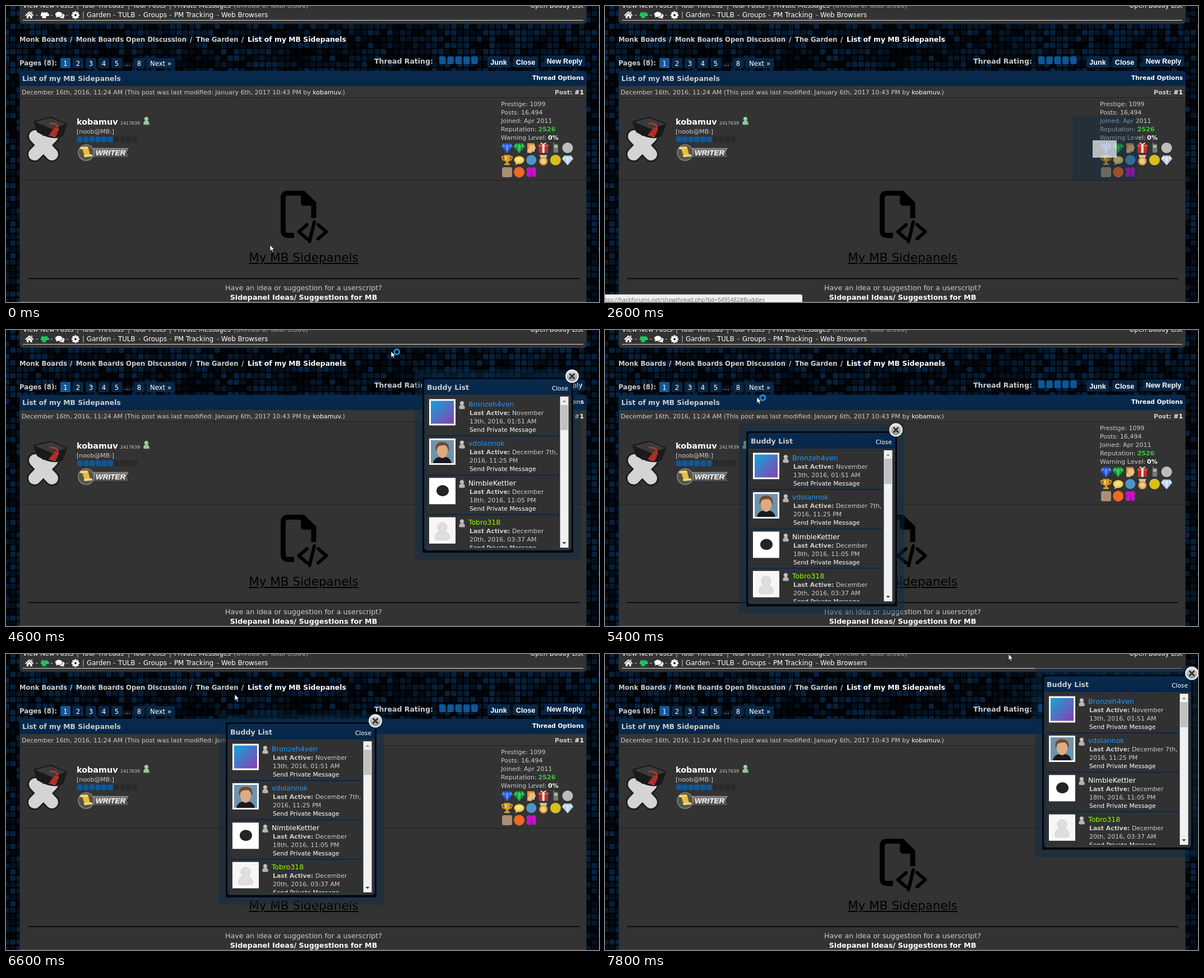
Recreate the animation shown at these times as an HTML page with a canvas. Size 1058 by 529 pixels, loop 8000 ms.

```html
<!DOCTYPE html>
<html lang="en">
<head>
<meta charset="utf-8">
<title>Buddy list</title>
<style>
html, body { margin: 0; width: 100%; height: 100%; overflow: hidden; background: #000; }
canvas, svg { position: absolute; left: 0; top: 0; width: 1058px; height: 529px; }
text { font-family: "DejaVu Sans", sans-serif; white-space: pre; }
.b { font-weight: bold; }
.e { text-anchor: end; }
.m { text-anchor: middle; }
.u { text-decoration: underline; }
.btn { font: bold 12.6px "Liberation Sans", sans-serif; }
.tag { font: italic bold 13.5px "Liberation Sans", sans-serif; }
.url { font-family: "Open Sans", sans-serif; }
</style>
</head>
<body>
<canvas id="tiles" width="1058" height="529"></canvas>
<svg id="stage" viewBox="0 0 1058 529">
  <defs>
    <linearGradient id="head" x2="0" y2="1"><stop stop-color="#082a4e"/><stop offset="1" stop-color="#072648"/></linearGradient>
    <linearGradient id="sky" x2="1" y2="1"><stop stop-color="#12a5dc"/><stop offset="1" stop-color="#8a3fae"/></linearGradient>
    <linearGradient id="steel" x2="0" y2="1"><stop stop-color="#858585"/><stop offset="1" stop-color="#454545"/></linearGradient>
    <linearGradient id="silver" x2="0" y2="1"><stop stop-color="#e4e4e4"/><stop offset="1" stop-color="#8c8c8c"/></linearGradient>
    <clipPath id="list"><rect x="2" y="31" width="257" height="270"/></clipPath>
  </defs>
</svg>
<script>
const WHITE = '#fff', TEXT = '#ccc', BLUE = '#0f5798', NAVY = '#082747';

// ---- markup helpers
const rect = (x, y, w, h, fill, r = 0, more = '') =>
  `<rect x="${x}" y="${y}" width="${w}" height="${h}" rx="${r}" fill="${fill}" ${more}/>`;
const text = (x, y, size, fill, str, cls = '') =>
  `<text x="${x}" y="${y}" font-size="${size}" fill="${fill}" class="${cls}">${str}</text>`;
const path = (d, fill, more = '') => `<path d="${d}" fill="${fill}" ${more}/>`;
const line = (d, color, w, more = '') => path(d, 'none', `stroke="${color}" stroke-width="${w}" ${more}`);
const disc = (x, y, r, fill, more = '') => `<circle cx="${x}" cy="${y}" r="${r}" fill="${fill}" ${more}/>`;
const at = (x, y, body, more = '') => `<g transform="translate(${x} ${y})" ${more}>${body}</g>`;
const row = (n, fn) => Array.from({ length: n }, (_, i) => fn(i)).join('');
const ROUND = 'stroke-linecap="round" stroke-linejoin="round"';

const pawn = (x, y, fill) => at(x, y,
  path('M-5.5 7Q-6 1-2.4 0A4 4 0 1 1 2.4 0Q6 1 5.5 7Q0 8.5-5.5 7Z', fill, 'stroke="#222" stroke-width=".5"') +
  disc(-1, -4, 1.5, '#fff', 'opacity=".45"'));

// ---- wallpaper
function drawTiles() {
  const c = document.getElementById('tiles').getContext('2d');
  const shades = ['#01050a', '#020a14', '#03101f', '#04182c', '#06213e'];
  let seed = 7;
  const rnd = () => (seed = (seed * 16807) % 2147483647) / 2147483647;
  const pitch = 11.4;
  for (let y = -3; y < 529; y += pitch)
    for (let x = -4; x < 1058; x += pitch) {
      c.fillStyle = shades[Math.floor(rnd() * 5)];
      c.beginPath();
      c.roundRect(x, y, 9.8, 9.8, 3);
      c.fill();
    }
}

// ---- page
function topBar() {
  const person = (x, y, s) => disc(x, y, 2.2 * s) + path(`M${x - 3.6 * s} ${y + 7 * s}v-2.5q0-2.5 3.6-2.5t3.6 2.5v2.5Z`);
  const cog = row(8, i => `<rect x="-1.6" y="-7" width="3.2" height="4" transform="rotate(${i * 45})"/>`) +
    `<circle r="3.7" fill="none" stroke="#fff" stroke-width="3.2"/>`;
  const links = [[144, 'Garden'], [191, '-'], [200, 'TULB'], [236, '-'], [245, 'Groups'], [291, '-'],
    [300, 'PM Tracking'], [376, '-'], [384, 'Web Browsers']];
  return rect(24, -12, 1012, 44, '#333', 6, `stroke="#0a2238"`) +
    text(30, 3, 11.6, WHITE, 'View New Posts') + text(126, 3, 11.6, TEXT, '|') +
    text(135, 3, 11.6, WHITE, 'Your Threads') + text(217, 3, 11.6, TEXT, '|') +
    text(226, 3, 11.6, WHITE, 'Your Posts') + text(291, 3, 11.6, TEXT, '|') +
    text(300, 3, 11.6, WHITE, 'Private Messages') + text(406, 3, 11.6, '#aaa', '(Unread 0, Total 5,500)') +
    text(1030, 3, 11.5, WHITE, 'Open Buddy List', 'e') +
    path('M34 16.5L41.7 9.5L49.5 16.5L48 17.8L41.7 12.2L35.5 17.8ZM36.8 17.6L41.7 13.3L46.7 17.6V22H43.2V18.5H40.3V22H36.8ZM45 10H47V13L45 11.5Z', WHITE) +
    `<g id="people" fill="#fff">${person(64.8, 12.4, .8)}${person(72.4, 12.4, .8)}${person(68.6, 13.8, 1.15)}</g>` +
    path('M88 15C88 9 100.5 9 100.5 15C100.5 18.6 96 20 92.5 19.2L89 21L90 18.3Q88 17 88 15Z', WHITE) +
    path('M101.5 13.5C105 15 105.3 18.5 102.7 20.3L103.7 22.8L100 21.4C97.5 22 95.5 21.3 94.5 20.4C99 20 102 17.5 101.5 13.5Z', WHITE) +
    at(124, 16.3, cog, 'fill="#fff"') +
    [53, 79.5, 107].map(x => text(x, 20, 11.7, TEXT, '-')).join('') + text(136, 20, 11.7, TEXT, '|') +
    links.map(([x, s]) => text(x, 20, 11.8, s === '-' ? TEXT : WHITE, s)).join('') +
    rect(30, 25, 1000, 1, '#ddd');
}

function threadBar() {
  const crumbs = [[24, 'Monk Boards'], [114, '/'], [125, 'Monk Boards Open Discussion'], [328, '/'], [339, 'The Garden'], [420, '/']];
  const pages = [[119, 2], [142, 3], [165, 4], [188, 5], [228, 8]];
  const button = (x, y, w, s) => rect(x, y, w, 20, NAVY, 2) + text(x + w / 2, y + 14.5, 12.6, WHITE, s, 'btn m');
  return crumbs.map(([x, s]) => text(x, 64, 11.6, TEXT, s, 'b')).join('') +
    text(431, 64, 12.4, WHITE, 'List of my MB Sidepanels', 'b') +
    text(24, 106, 11.7, TEXT, 'Pages (8):', 'b') +
    rect(97, 93, 18, 18, BLUE) + text(106, 106.5, 11.7, WHITE, '1', 'm') +
    pages.map(([x, n]) => rect(x, 93, 19, 18, NAVY) + text(x + 9.5, 106.5, 11.7, WHITE, n, 'm')).join('') +
    text(211, 106.5, 11.7, TEXT, '...') +
    rect(251, 93, 50, 18, NAVY) + text(276, 106.5, 11.7, WHITE, 'Next »', 'm') +
    text(657, 103, 12.5, TEXT, 'Thread Rating:', 'b') +
    row(5, i => rect(773 + i * 14.3, 90, 11.5, 14, BLUE, 3)) +
    button(859, 90, 40, 'Junk') + button(905, 90, 44, 'Close') + button(960, 88.5, 73, 'New Reply');
}

function author() {
  const cross = 'M52 233L82 265M82 233L51 265';
  return line(cross, '#1f1f1f', 28, ROUND) + line(cross, '#d4d4d4', 22, ROUND) +
    path('M51 207L80 200L107 211L100 231Q84 240 57 224Z', '#1a1a1a', 'stroke="#1a1a1a" stroke-width="4" stroke-linejoin="round"') +
    path('M52 207L80 200L107 211L82 220Z', '#3a3a3a') +
    line('M79 210Q93 209 92 219', '#b8332b', 3, ROUND) + path('M87 217L95 220L88 235L76 231Z', '#b8332b') +
    line('M89 220L80 230M93 222L85 232', '#701c18', 1) +
    text(126, 212, 14.4, WHITE, 'kobamuv', 'b') + text(204, 212, 7.9, TEXT, '2417639') +
    pawn(250.5, 205, '#8fc79a') + text(126, 228, 10.9, TEXT, '[noob@MB:]') +
    row(10, i => rect(127 + i * 10.85, 233, 9.6, 10.5, i < 6 ? BLUE : '#292929', 3)) +
    path('M150 253H220L216 262L220 271.5H150Z', 'url(#steel)', 'stroke="#222"') +
    disc(143, 262, 14, '#55524a', 'stroke="#8a8a8a" stroke-width="1.5"') +
    path('M135 253L147 252L150 266L140 268Z', '#e6bd45', 'stroke="#8f6a17"') +
    line('M134 254L144 253M141 268L152 267', '#f3d77c', 4, ROUND) +
    text(160, 267, 13.5, WHITE, 'WRITER', 'tag');
}

function awards() {
  const gem = (base, light) => path('M-10-2L-6-8H6L10-2L0 9.5Z', base) +
    path('M-10-2L-6-8L-3-2ZM-3-2L0-8L3-2L0 9.5ZM10-2L6-8L3-2Z', light, 'opacity=".55"');
  const petals = [[-4, -4], [4, -4], [-4, 4], [4, 4]].map(([x, y]) => disc(x, y, 4.8, '#c115c4')).join('');
  const icons = [
    gem('#1f55dc', '#8fb8ff'), gem('#0c9a30', '#6fe68a'),
    path('M-7-8H5Q7-2 8 1L6 3V6Q3 8 1 6V9H-7Z', '#eebc80') + path('M-7-8H5L4-5H-4V2H-7Z', '#e0913f'),
    rect(-8, -3, 16, 12, '#c22c2c', 1) + rect(-9, -6, 18, 4, '#df4a40') + rect(-2, -6, 4, 15, '#f4e3d0') + line('M0-6L-5-9M0-6L5-9', '#f4e3d0', 2),
    rect(-4, -7, 9, 16, '#656b68', 2) + rect(-4, -10, 2, 5, '#656b68') + rect(-2.5, -5, 6, 5, '#a9c5a4') + line('M-2 3H4M-2 6H4', '#bbb', 1, 'stroke-dasharray="1.5 .8"'),
    disc(0, 0, 9.5, '#bcbcbc'),
    path('M-6-9H6Q6 2 2 3V6H5V9H-5V6H-2V3Q-6 2-6-9Z', '#d99c2b') + line('M-6-6H-9Q-9 0-4 1M6-6H9Q9 0 4 1', '#d99c2b', 2) + rect(-3, -7, 2, 7, '#ffe08a'),
    '<ellipse rx="9" ry="7" fill="#f3cf55"/>' + path('M-5 4L-7 9L0 6Z', '#f3cf55') + line('M-5-2H5M-5 1H3', '#fff4c4', 1.6),
    disc(0, 0, 9, '#4c94c8'),
    path('M-7-9H7L3 0H-3Z', '#d8c7ad') + disc(0, 2, 7.5, '#dfa24c') + disc(0, 2, 4.5, '#f3cd82'),
    disc(0, 0, 9.5, '#d9bd20'), gem('#b4cdea', '#fff'),
    rect(-9, -9, 18, 18, '#a98e73', 3), disc(0, 0, 9.5, '#f26822'),
    petals + line('M0 2Q1 8 5 9', '#8a0d8e', 2)
  ];
  return icons.map((s, i) => at(894 + i % 6 * 21.6, 253.5 + Math.floor(i / 6) * 21.7, s)).join('');
}

function post() {
  const stats = ['Prestige: 1099', 'Posts: 16,494', 'Joined: Apr 2011', 'Reputation:', 'Warning Level:'];
  return path('M24 143V122Q24 116 30 116H1030Q1036 116 1036 122V143Z', 'url(#head)') +
    rect(24, 143, 1012, 386, '#333') + rect(24, 143, 1012, 20, '#363636') +
    rect(24, 163, 1012, 1, '#222') + rect(24, 311, 1012, 1, '#232323') +
    line('M24.5 143V529M1035.5 143V529', '#0a2238', 1) +
    text(29, 134, 12.4, TEXT, 'List of my MB Sidepanels', 'b') + text(1031, 132, 10.6, WHITE, 'Thread Options', 'b e') +
    text(28, 157.5, 11.03, TEXT, 'December 16th, 2016, 11:24 AM (This post was last modified: January 6th, 2017 10:43 PM by <tspan fill="#fff">kobamuv.</tspan>)') +
    text(1031, 157.5, 10.9, TEXT, 'Post: <tspan fill="#fff">#1</tspan>', 'b e') +
    author() +
    stats.map((s, i) => text(883, 179 + i * 15.1, 11, TEXT, s)).join('') +
    text(949.5, 224.3, 11.2, '#32cd32', '2526', 'b') + text(967, 239.4, 11, WHITE, '0%', 'b') +
    awards() +
    line('M514 410H503Q494.5 410 494.5 401V343Q494.5 334.5 503 334.5H530L549 353V379', '#000', 9) +
    path('M526 332L552 357H532Q526 357 526 351Z', '#000') +
    line('M537 391L522.5 403.5L537 416M550 386L541.5 421M557 391L571.5 403.5L557 416', '#000', 6, ROUND) +
    text(531, 457, 21.5, '#000', 'My MB Sidepanels', 'm u') +
    rect(39, 486.5, 984, 1.5, '#000') +
    text(531, 507.5, 12.63, TEXT, 'Have an idea or suggestion for a userscript?', 'm') +
    text(531, 524.5, 12.7, WHITE, 'Sidepanel Ideas/ Suggestions for MB', 'b m') +
    line('M24 528.5H1036', '#777', 1, 'stroke-dasharray="1 1"');
}

// ---- floating panel, origin at its top left corner
function buddyPanel() {
  const faces = [
    rect(0, 0, 41, 41, 'url(#sky)'),
    rect(0, 0, 41, 41, '#6f93ad') + path('M4 41Q6 31 15 30H26Q35 31 37 41Z', '#17191f') +
      '<ellipse cx="20.5" cy="19" rx="9.5" ry="13" fill="#dcab83"/>' + path('M9 20Q6 3 21 3Q35 4 32 20Q30 11 25 9Q15 9 12 12Z', '#70492c'),
    '<ellipse cx="21" cy="20" rx="11" ry="10" fill="#242424"/>',
    rect(0, 0, 41, 41, '#f6f6f6') + path('M8 36Q7 25 16 22A8.5 8.5 0 1 1 25 22Q34 25 33 36Q20 40 8 36Z', '#dedede', 'stroke="#cfcfcf"')
  ];
  const buddies = [
    ['Bronzeh4ven', '#1e98ff', 'November', '13th, 2016, 01:51 AM'],
    ['vdolannok', '#1e98ff', 'December 7th,', '2016, 11:25 PM'],
    ['NimbleKettler', WHITE, 'December', '18th, 2016, 11:05 PM'],
    ['Tobro318', '#8cff00', 'December', '20th, 2016, 03:37 AM']
  ];
  const entry = ([name, color, day, rest], i) => at(0, 31 + i * 70.4,
    rect(3, 0, 239, 69.5, '#313131', 4, 'stroke="#08264a"') +
    rect(9, 4.5, 47, 47, WHITE) + at(12, 7.5, faces[i]) + pawn(67.5, 15, '#b5b5b5') +
    text(79, 18, 12.45, color, name) +
    text(81, 33, 10.9, TEXT, `<tspan class="b">Last Active:</tspan> ${day}`) +
    text(81, 48, 11, TEXT, rest) + text(81, 63, 10.75, WHITE, 'Send Private Message'));
  return rect(-16, -17, 295, 340, 'rgba(10,42,70,.45)', 3) +
    rect(-3, -3, 269, 313, '#020811') +
    rect(.5, .5, 262, 305, '#333', 5, 'stroke="#0a2b4d"') +
    path('M0 28V5Q0 0 5 0H258Q263 0 263 5V28Z', 'url(#head)') +
    text(5, 19, 12.6, TEXT, 'Buddy List', 'b') + text(257, 19.5, 10.7, WHITE, 'Close', 'e') +
    `<g clip-path="url(#list)">${buddies.map(entry).join('')}` +
    rect(242.5, 31, 15, 270, '#f1f1f1') + rect(243.5, 46, 13, 45, '#c1c1c1') +
    path('M246.5 41L250 37L253.5 41Z', '#999') + path('M246.5 291L250 295L253.5 291Z', '#444') + '</g>' +
    disc(264, -5.5, 10.8, 'url(#silver)', 'stroke="#f2f2f2" stroke-width="2.2"') +
    line('M260.3-9.2L267.7-1.8M267.7-9.2L260.3-1.8', '#333', 3, ROUND);
}

const stage = document.getElementById('stage');
drawTiles();
stage.insertAdjacentHTML('beforeend', topBar() + threadBar() + post() +
  `<g id="status">${path('M0 515.5H349Q352 515.5 352 519V529H0Z', '#f1f1f1')}${text(-3, 528.5, 10, '#6a6a6a', 'ttps://hackforums.net/showthread.php?tid=5495482#Buddies', 'url')}</g>` +
  `<g id="seed">${rect(834, 196, 115, 117, 'rgba(10,42,70,.38)', 4)}${rect(870, 240, 43, 31, 'rgba(255,255,255,.68)')}</g>` +
  `<g id="panel">${buddyPanel()}</g>` +
  `<g id="cursor">${path('M0 0V11L2.6 8.7L4.4 12.8L6.2 12L4.4 8H7.9Z', WHITE, 'stroke="#000" stroke-width=".7"')}<circle id="busy" cx="10.3" cy="1" r="4.5" fill="none" stroke="#2191dc" stroke-width="3"/></g>`);

// ---- motion: [ms, x, y]
const pointer = [[0, 471, 427], [1200, 68, 29], [1400, 45, 8], [2800, 75, 20], [3600, 486, 60], [4400, 695, 34],
  [4600, 687, 38], [4800, 676, 36], [5000, 590, 52], [5400, 271, 120], [5600, 180, 128], [6200, 93, 133],
  [6400, 180, 118], [6800, 635, 25], [7000, 735, 8], [7200, 738, 10], [7800, 720, 0]];
const drag = [[2600, 751, 92], [4400, 751, 92], [4600, 746, 88], [4800, 734, 86], [5000, 640, 110], [5400, 255, 184],
  [5600, 130, 196], [6000, 18, 204], [6200, 0, 206], [6400, 110, 180], [6800, 680, 70], [7000, 807, 48],
  [7200, 815, 50], [7800, 783, 40]];

function place(track, t) {
  let i = 0;
  while (i < track.length - 2 && t >= track[i + 1][0]) i++;
  const [t0, x0, y0] = track[i], [t1, x1, y1] = track[i + 1];
  let k = Math.max(0, Math.min(1, (t - t0) / (t1 - t0)));
  if (t < 1200) k = k * k * (3 - 2 * k);
  return [x0 + (x1 - x0) * k, y0 + (y1 - y0) * k].map(Math.round);
}

const part = id => document.getElementById(id);
const show = (id, on) => part(id).style.display = on ? '' : 'none';

function render(t) {
  part('people').setAttribute('fill', t >= 1600 ? '#22c55e' : WHITE);
  show('status', t >= 2000 && t < 2800);
  show('seed', t >= 2600 && t < 2800);
  show('panel', t >= 2800);
  show('cursor', t < 1600 || t >= 2800);
  show('busy', t >= 2800 && t < 6000);
  const [px, py] = place(drag, t);
  const growing = t < 3000;
  part('panel').setAttribute('transform', growing ? 'translate(795 148) scale(.7)' : `translate(${px} ${py})`);
  part('panel').setAttribute('opacity', growing ? .6 : 1);
  part('cursor').setAttribute('transform', `translate(${place(pointer, t)})`);
}

const start = performance.now();
let last = -1;
function tick() {
  const t = Math.floor((performance.now() - start) % 8000 / 200) * 200;
  if (t !== last) render(last = t);
  requestAnimationFrame(tick);
}
tick();
</script>
</body>
</html>
```
